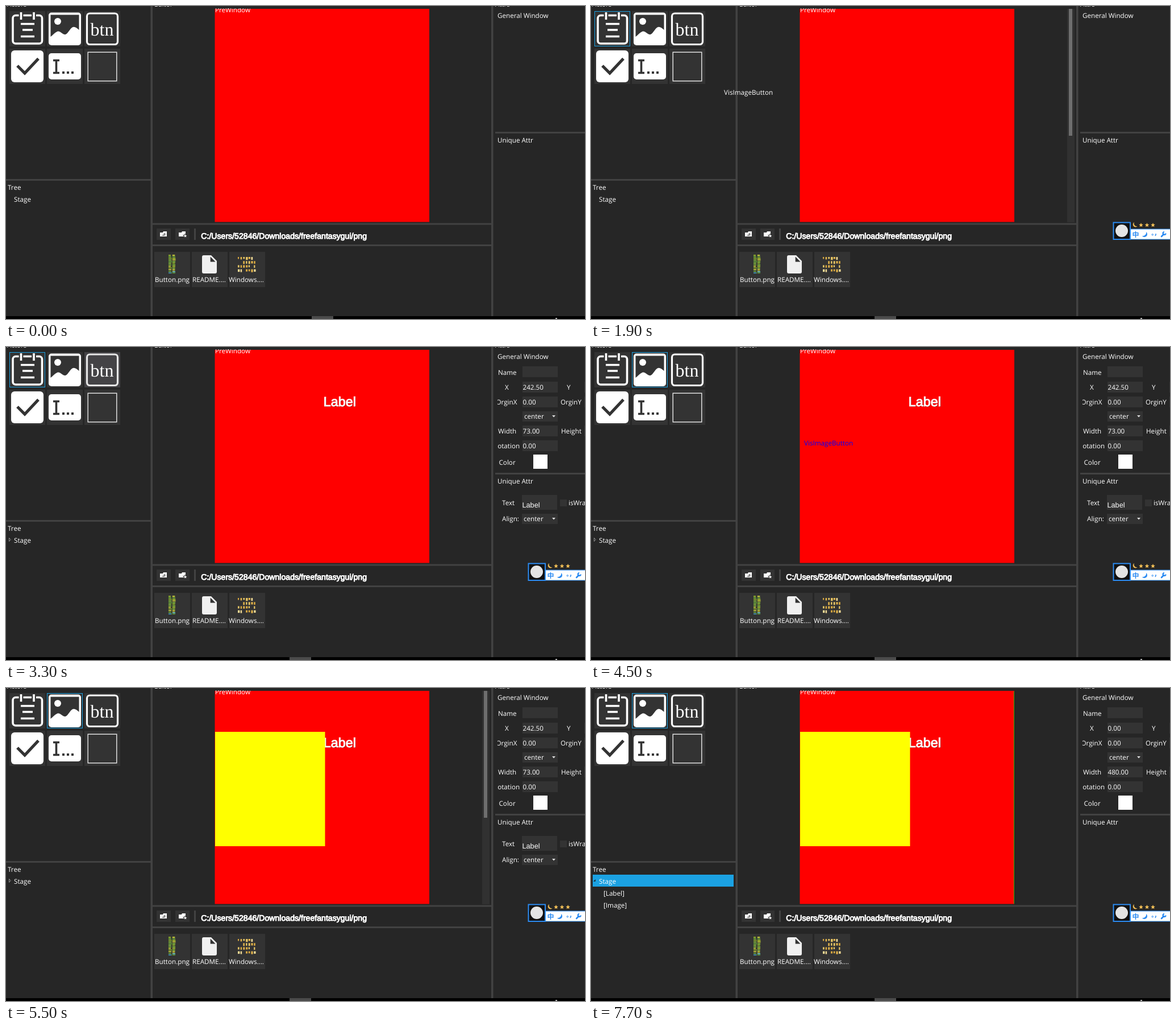
Animation of 1019 by 550 pixels, one loop 8 s. Source, as an HTML page with a canvas:

```html
<!DOCTYPE html>
<html lang="en">
<head>
<meta charset="utf-8">
<title>Scene editor</title>
<style>
html, body { margin: 0; width: 100%; height: 100%; overflow: hidden; background: #262626; }
canvas { display: block; }
</style>
</head>
<body>
<canvas id="stage" width="1019" height="550"></canvas>
<script>
const ctx = document.getElementById('stage').getContext('2d');
const LOOP = 8000;
const UI = '11.67px "Open Sans", "Noto Sans", sans-serif';
const ARIAL = '"Liberation Sans", Arial, sans-serif';
const BG = '#262626', TILE = '#333', HOVER = '#444346', LINE = '#424242';
const BLUE = '#1ba1e2', IME = '#2b8bf2', GOLD = '#f3c057';

// ---------- helpers ----------
function box(x, y, w, h, color) {
  ctx.fillStyle = color;
  ctx.fillRect(x, y, w, h);
}
function frame(x, y, w, h, color, width = 1) {
  ctx.strokeStyle = color;
  ctx.lineWidth = width;
  ctx.strokeRect(x + width / 2, y + width / 2, w - width, h - width);
}
function round(x, y, w, h, r, color, lineWidth) {
  ctx.beginPath();
  ctx.roundRect(x, y, w, h, r);
  if (lineWidth) {
    ctx.strokeStyle = color;
    ctx.lineWidth = lineWidth;
    ctx.stroke();
  } else {
    ctx.fillStyle = color;
    ctx.fill();
  }
}
function disc(x, y, r, color) {
  ctx.fillStyle = color;
  ctx.beginPath();
  ctx.arc(x, y, r, 0, 7);
  ctx.fill();
}
function shape(d, color) {
  ctx.fillStyle = color;
  ctx.fill(new Path2D(d));
}
function stroke(d, color, width) {
  ctx.strokeStyle = color;
  ctx.lineWidth = width;
  ctx.stroke(new Path2D(d));
}
function text(s, x, y, color = '#fff', font = UI) {
  ctx.font = font;
  ctx.fillStyle = color;
  ctx.fillText(s, x, y);
}
function heavyText(s, x, y, size, weight) {
  text(s, x + 1, y + 1, 'rgba(0,0,0,.45)', `${size}px ${ARIAL}`);
  text(s, x, y, '#fff', `${size}px ${ARIAL}`);
  ctx.strokeStyle = '#fff';
  ctx.lineWidth = weight;
  ctx.strokeText(s, x, y);
}
function clipped(x, y, w, h, draw) {
  ctx.save();
  ctx.beginPath();
  ctx.rect(x, y, w, h);
  ctx.clip();
  draw();
  ctx.restore();
}
function star(x, y, r, color) {
  ctx.fillStyle = color;
  ctx.beginPath();
  for (let i = 0; i < 10; i++) {
    const a = i * Math.PI / 5 - Math.PI / 2, d = i % 2 ? r * 0.45 : r;
    ctx.lineTo(x + d * Math.cos(a), y + d * Math.sin(a));
  }
  ctx.fill();
}
function random(seed) {
  return () => (seed = (seed * 16807) % 2147483647) / 2147483647;
}

// Last value whose start time has passed.
function at(t, steps) {
  let value = steps[0][1];
  for (const [start, v] of steps) if (t >= start) value = v;
  return value;
}
function along(t, points) {
  const i = Math.max(0, points.findLastIndex(p => t >= p[0]));
  const a = points[i], b = points[i + 1];
  if (!b) return a.slice(1);
  const k = (t - a[0]) / (b[0] - a[0]);
  return [a[1] + (b[1] - a[1]) * k, a[2] + (b[2] - a[2]) * k];
}

// ---------- timeline ----------
const hovered = [[0, -1], [1000, 5], [1100, 4], [1200, 1], [1300, 0], [1600, -1],
  [3000, 1], [3300, 2], [3700, 1], [4000, -1]];
const selected = [[0, -1], [1600, 0], [4000, 1]];
const drags = [
  { end: 2800, path: [[1600, 38, 40], [1700, 118, 82], [1900, 320, 162], [2100, 468, 136], [2400, 587, 95]] },
  { end: 4700, path: [[4000, 104, 40], [4200, 262, 112], [4500, 461, 179]] }
];
const inspected = [[0, null],
  [2800, { x: '242.50', width: '73.00', label: true }],
  [4700, { x: '-9.50', width: '256.00' }],
  [5500, { x: '242.50', width: '73.00', label: true }],
  [6700, { x: '0.00', width: '480.00' }]];
const scrollbars = [[600, 1900, 2400], [4800, 6900, 7700]];

// ---------- parts ----------
const icons = [
  () => {
    round(12, 16.5, 51.5, 49.5, 5, '#fff', 3.6);
    for (const x of [26.5, 49]) {
      box(x - 4, 13, 8, 10, TILE);
      box(x - 1.8, 11, 3.6, 13, '#fff');
    }
    stroke('M26 31.500H50M29 42H47M26 53.500H50', '#fff', 3.4);
  },
  () => {
    round(75, 11.5, 57, 57.5, 5, '#fff');
    shape('M78.500 15.500H128.500V42C124 38 120 35 116 38C110 43 108 51 103 50C98 49 95 43 90 45C85 47 82 52 78.500 54Z', TILE);
    disc(91, 27, 6, '#fff');
  },
  hover => {
    round(142.5, 13, 54, 54.5, 5, hover ? '#e6e6e6' : '#fff', 3.2);
    text('btn', 148.5, 52, '#fff', '32px "Liberation Serif", "Times New Roman", serif');
  },
  () => {
    round(9, 78, 57, 56, 6, '#fff');
    stroke('M20 105L33 118L57 92.500', TILE, 5.2);
  },
  () => {
    round(75, 83, 57, 46, 5, '#fff');
    stroke('M83 95.500H94M88.500 95V117M83 117.500H94', TILE, 3.6);
    for (const x of [99, 107, 115]) box(x, 115, 4, 4, TILE);
  },
  () => frame(143.5, 80.5, 52, 52, '#ececec', 1.4)
];

function actorTiles(t) {
  const over = at(t, hovered), chosen = at(t, selected);
  icons.forEach((icon, i) => {
    const x = 6 + 66 * (i % 3), y = i < 3 ? 9 : 75;
    box(x, y, 63, 62, i === over ? HOVER : TILE);
    icon(i === over);
    if (i === chosen) frame(x, y, 63, 62, BLUE);
  });
}

function panels(t) {
  box(0, 0, 1019, 550, BG);
  box(254.5, 0, 3.5, 545, LINE);
  box(854, 0, 3.5, 545, t >= 400 && t < 600 ? '#5a5a5a' : LINE);
  box(0, 304, 255, 3, LINE);
  box(861, 221, 158, 3, LINE);
  box(258, 381.5, 596, 3, LINE);
  box(258, 419, 596, 3, LINE);
  box(0, 545, 1019, 5, '#000');
  box(t < 1600 ? 538 : 499, 545, 38, 5, '#4b4b4b');
  box(967, 548, 3, 2, '#aaa');
  text('Actors', 2, 1);
  text('Editor', 261, 1);
  text('Attrs', 861, 1);
  text('General Window', 865, 21);
  text('Unique Attr', 865, 240);
  text('Tree', 3, 323);
}

function folder(x) {
  box(x - 6, 391, 25, 20, TILE);
  shape(`M${x} 398H${x + 5}L${x + 6} 396H${x + 12}V405H${x}Z`, '#fff');
}

function spriteSheet(x, y, columns, rows, cell, fill, colors, seed) {
  const next = random(seed);
  for (let r = 0; r < rows; r++)
    for (let c = 0; c < columns; c++)
      box(x + c * cell[0], y + r * cell[1], cell[0] * (fill + 0.3 * next()),
        cell[1] * (fill + 0.3 * next()), colors[Math.floor(next() * colors.length)]);
}

function fileBrowser() {
  folder(271);
  stroke('M275 403H279V400M277 401.500L279 399.500L281 401.500', TILE, 1);
  folder(304);
  star(315, 404, 4.5, TILE);
  star(315.5, 404, 3, '#fff');
  box(331, 391, 3, 20, LINE);
  heavyText('C:/Users/52846/Downloads/freefantasygui/png', 343.3, 409, 14.12, 1);

  ['Button.png', 'README....', 'Windows....'].forEach((name, i) => {
    box(261 + 66 * i, 432, 63, 62, TILE);
    text(name, [262, 328, 392][i], 485);
  });
  spriteSheet(286, 437, 2, 12, [6.8, 2.8], 0.6, ['#9fb52c', '#86a52a', '#c2c43a', '#5f9138', '#79a83a'], 7);
  box(286, 468, 5, 2, '#3f86a8');
  box(293, 466, 5, 2, '#4b96b0');
  shape('M348 438H361L371 448V467Q371 470 368 470H348Q345 470 345 467V441Q345 438 348 438Z', '#f0f0f0');
  shape('M359.700 440.500V449.400H368.600Z', TILE);
  spriteSheet(408, 441, 7, 4, [4.7, 7.2], 0.45, ['#e5c565', '#efd994', '#d9a940', '#e8b84c', TILE], 31);
}

function canvasArea(t) {
  box(367.5, 5, 377.5, 374.5, '#f00');
  clipped(368, 4, 377, 20, () => text('PreWindow', 368, 11));
  if (t >= 2800) heavyText('Label', 558.8, 103.5, 23.3, 1);
  if (t >= 4700) box(368, 77, 193.5, 201, '#ff0');
  if (t >= 6700) box(744, 6, 1, 373, '#3fae00');

  const bar = scrollbars.find(([start, , end]) => t >= start && t < end);
  if (bar) {
    const k = Math.max(0, (t - bar[1]) / (bar[2] - bar[1]));
    ctx.globalAlpha = 1 - k * k * (3 - 2 * k);
    box(838, 5, 13, 375, '#313131');
    box(841, 5, 6, 223, '#6e6e6e');
    ctx.globalAlpha = 1;
  }
}

function tree(t) {
  const open = t >= 7500;
  if (t >= 6400) box(3, 328, 248, 21, t < 6700 ? HOVER : BLUE);
  text('Stage', 14, 343.5);
  if (open) {
    shape('M8 336V340H4Z', '#17303c');
    text('[Label]', 22, 364.5);
    text('[Image]', 22, 385.5);
  } else if (t >= 2800) {
    stroke('M5.500 335.500L8.500 338.500L5.500 341.500Z', '#999', 0.9);
  }
}

function field(value, y) {
  box(909, y, 62, 19, TILE);
  text(value, 909.5, y + 13.6);
}
function dropdown(x, y) {
  box(x, y, 971 - x, 18, TILE);
  text('center', x + 3, y + 13.2);
  shape(`M961 ${y + 7}H967L964 ${y + 10.5}Z`, '#ddd');
}

function inspector(t) {
  const actor = at(t, inspected);
  if (!actor) return;
  clipped(865, 25, 154, 300, () => {
    const labels = [['Name', 866, 48.6], ['X', 878, 74.6], ['Y', 987, 74.6], ['OrginX', 862.5, 100.6],
      ['OrginY', 976, 100.6], ['Width', 866, 151.6], ['Height', 977, 151.6], ['Rotation', 858, 177.6],
      ['Color', 867.5, 206.6]];
    for (const label of labels) text(...label);
    field('', 34);
    field(actor.x, 61);
    field('0.00', 87);
    dropdown(909, 113);
    field(actor.width, 138);
    field('0.00', 164);
    for (const y of [61, 87, 138]) box(1018, y, 1, 19, TILE);
    box(928, 189, 25, 25, '#fff');
    if (!actor.label) return;
    text('Text', 873, 278.2);
    box(908, 260, 62, 26, TILE);
    text('Label', 908.5, 281.5, '#fff', `12.7px ${ARIAL}`);
    box(975, 268, 12, 12, TILE);
    text('isWrap', 990, 278.2);
    text('Align:', 873, 306.2);
    dropdown(908, 293);
  });
}

function inputBar() {
  box(949, 391.5, 70, 19, IME);
  box(950, 392.5, 69, 17, '#fff');
  box(918.5, 379.5, 31.5, 31.5, IME);
  box(920.5, 381.5, 27.5, 27.5, '#111');
  disc(934, 395, 11, '#e4e4e4');
  text('中', 952.5, 406, IME, 'bold 12px "Noto Sans CJK SC", "Noto Sans CJK", sans-serif');
  shape('M977 397A5 5 0 1 1 970 404A6 6 0 0 0 977 397Z', IME);
  ctx.lineCap = 'round';
  stroke('M1004 405L1008 401', IME, 2.6);
  ctx.lineCap = 'butt';
  ctx.strokeStyle = IME;
  ctx.lineWidth = 2.2;
  ctx.beginPath();
  ctx.arc(1009, 399.5, 2.5, 0, 4.7);
  ctx.stroke();
  round(987, 400.5, 2.5, 2.5, 1.2, IME, 1);
  stroke('M994 400V402L993 404', IME, 1.5);
  shape('M956 380A4.500 4.500 0 1 0 961.500 387A5 5 0 0 1 956 380Z', GOLD);
  for (const x of [968, 978.5, 989]) star(x, 385, 4, GOLD);
}

function dragged(t) {
  const drag = drags.find(d => t >= d.path[0][0] && t < d.end);
  if (!drag) return;
  const [x, y] = along(t, drag.path);
  text('VisImageButton', x - 86, y - 6, x > 368 ? '#00f' : '#fff');
}

function render(now) {
  const t = Math.floor(now % LOOP / 100) * 100;
  panels(t);
  actorTiles(t);
  fileBrowser();
  canvasArea(t);
  tree(t);
  inspector(t);
  if (t >= 1600) inputBar();
  dragged(t);
}

ctx.textRendering = 'geometricPrecision';
const start = performance.now();
(function tick() {
  render(performance.now() - start);
  requestAnimationFrame(tick);
})();
</script>
</body>
</html>
```
